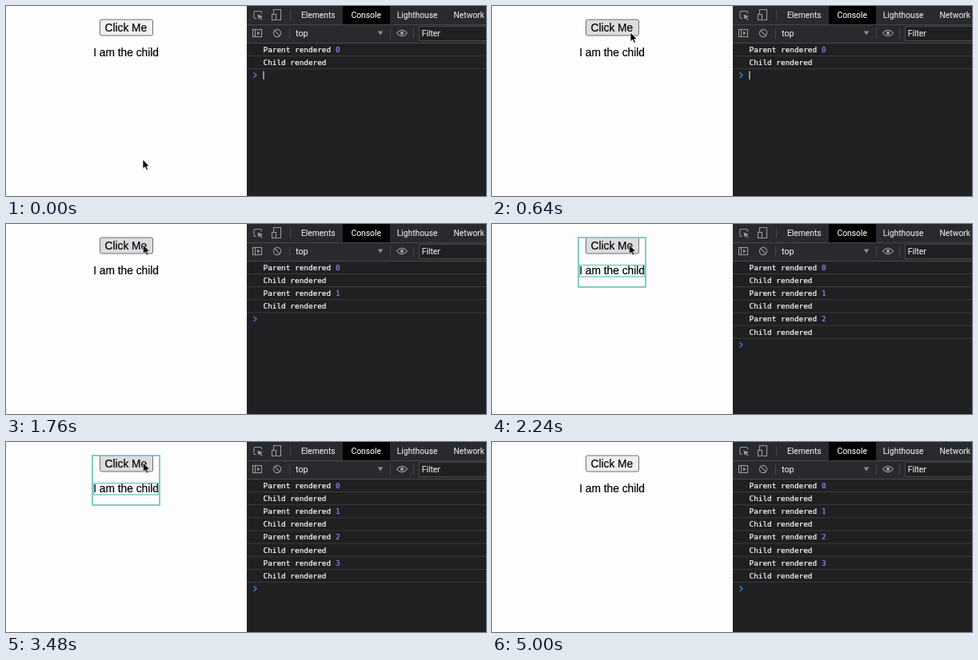
Write an HTML page that moves like this. It is 600x238 px and loops after 5040 ms.

```html
<!DOCTYPE html>
<html lang="en">
<head>
<meta charset="utf-8">
<title>Render log</title>
<style>
  html, body { margin: 0; width: 100%; height: 100%; overflow: hidden; background: #fefdfe; }
  svg { display: block; width: 600px; height: 238px; }
  .page { font: 13.75px "Liberation Sans", Arial, sans-serif; }
  .page text { fill: #000; stroke: #000; stroke-width: .2; }
  .ui { font: 10.3px Roboto, sans-serif; fill: #e8e8ea; stroke: #e8e8ea; stroke-width: .1; }
  .log { font: 9.4px "DejaVu Sans Mono", monospace; fill: #fff; stroke: #fff; stroke-width: .2; }
  .num { fill: #9780ff; stroke: #9780ff; }
  .icon { fill: none; stroke: #999; stroke-width: 1.1; }
  .line { fill: none; stroke: #46474a; }
  .row { stroke: #3a3a3d; }
  .hot { fill: none; stroke: #7fcdc6; }

  .cursor, .button, .caret, .prompt, .flash, .log1, .log2, .log3 {
    animation: 5040ms step-end infinite;
  }
  .cursor { animation-name: move; animation-timing-function: linear; }
  .button { animation-name: hover; }
  .caret { animation-name: blur; }
  .prompt { animation-name: push; }
  .flash { animation-name: flash; }
  .log1 { animation-name: first; }
  .log2 { animation-name: second; }
  .log3 { animation-name: third; }

  @keyframes move {
    0% { transform: translate(171px, 192.3px); animation-timing-function: cubic-bezier(.4, 0, .45, 1); }
    7.14% { transform: translate(177.5px, 41.5px); animation-timing-function: ease-out; }
    11.1%, 25.4% { transform: translate(173px, 33px); animation-timing-function: ease-in-out; }
    33.3%, 74.6% { transform: translate(171.5px, 26px); animation-timing-function: ease-in; }
    80.2%, 100% { transform: translate(177px, -18px); }
  }
  @keyframes hover {
    0% { fill: #efeff0; }
    9.52% { fill: #dcdce0; }
    77.8%, 100% { fill: #efeff0; }
  }
  @keyframes blur { 0% { opacity: 1; } 13.49%, 100% { opacity: 0; } }
  @keyframes push {
    0% { transform: translateY(0); }
    15.08% { transform: translateY(32.3px); }
    38.89% { transform: translateY(64.6px); }
    65.08%, 100% { transform: translateY(96.9px); }
  }
  @keyframes flash {
    0% { opacity: 0; }
    15.08% { opacity: 1; }
    22.22% { opacity: 0; }
    38.89% { opacity: 1; }
    46.03% { opacity: 0; }
    65.08% { opacity: 1; }
    72.22%, 100% { opacity: 0; }
  }
  @keyframes first { 0% { opacity: 0; } 15.08%, 100% { opacity: 1; } }
  @keyframes second { 0% { opacity: 0; } 38.89%, 100% { opacity: 1; } }
  @keyframes third { 0% { opacity: 0; } 65.08%, 100% { opacity: 1; } }
</style>
</head>
<body>
<svg viewBox="0 0 600 238">
  <defs>
    <g id="pair">
      <path class="row" d="M301 62.5H600M301 78.7H600"/>
      <text class="log" x="321.5" y="57.8">Parent rendered</text>
      <text class="log" x="321.5" y="74">Child rendered</text>
    </g>
  </defs>

  <g class="page">
    <rect class="button" x="117.5" y="17" width="66" height="20" rx="2" fill="#efeff0" stroke="#707070"/>
    <text x="123.500" y="31.500">Click Me</text>
    <text x="109.200" y="63">I am the child</text>
  </g>
  <g class="flash hot">
    <rect x="108" y="17" width="84" height="62" stroke-width="2"/>
    <rect x="109.5" y="51.5" width="81" height="14.5" stroke-width="1.5"/>
  </g>

  <rect x="301" width="299" height="238" fill="#202022"/>
  <rect x="301" width="299" height="46" fill="#292a2d"/>
  <rect x="421" width="59" height="23" fill="#000"/>
  <path class="line" d="M301 23.5H600M301 46.5H600M355.5 5V18M354.5 28V41M480.5 28V41M509.5 28V41"/>

  <g class="icon">
    <path d="M313 15.5H311.5Q310 15.5 310 14V8Q310 6.5 311.5 6.5H318Q319.5 6.5 319.5 8V9.5"/>
    <path d="M314.5 10.5L321 13L318.3 14.2L320.5 17L319.3 17.8L317.3 15L315.5 16.5Z" fill="#999" stroke="none"/>
    <path d="M334.5 10V4.5H343.5V17.5H338.5"/>
    <rect x="332.5" y="10.5" width="5" height="7"/>
    <rect x="308.5" y="29.5" width="11" height="9"/>
    <path d="M311.5 29.5V38.5"/>
    <path d="M314 31.5L317.5 34L314 36.5Z" fill="#999" stroke="none"/>
    <circle cx="339" cy="34" r="4.6"/>
    <path d="M335.8 30.8L342.2 37.2"/>
    <path d="M488.5 34Q495 26.5 501.5 34Q495 41.5 488.5 34Z"/>
    <circle cx="495" cy="34" r="2.2" fill="#999" stroke="none"/>
    <path d="M464.7 31.5H471.3L468 36.5Z" fill="#8c8c8c" stroke="none"/>
  </g>

  <rect x="516.5" y="25.5" width="90" height="18" fill="#202022" stroke="#48494c"/>
  <g class="ui">
    <text x="369" y="14.7">Elements</text>
    <text x="431.5" y="14.7" fill="#fff">Console</text>
    <text x="488.7" y="14.7">Lighthouse</text>
    <text x="559.5" y="14.7">Network</text>
    <text x="362" y="37.7" font-size="10.8">top</text>
    <text x="519.7" y="38.2">Filter</text>
  </g>

  <g id="logs"></g>
  <g class="prompt">
    <path d="M309.5 83.5L313 86.7L309.5 90" fill="none" stroke="#397fe0" stroke-width="1.4"/>
  </g>
  <path class="caret" d="M322 81.5V92" stroke="#dcdcdc" stroke-width="1.2"/>

  <path class="cursor" d="M0 0V11.5L2.7 9.2L4.5 13.2L6.5 12.3L4.8 8.4H8.3Z"
        fill="#000" stroke="#fff" stroke-width=".8"/>
</svg>
<script>
  const pair = n => `<g class="log${n}"><g transform="translate(0 ${n * 32.3})">
    <use href="#pair"/><text class="log num" x="412" y="57.8">${n}</text></g></g>`;
  document.getElementById("logs").innerHTML = [0, 1, 2, 3].map(pair).join("");
</script>
</body>
</html>
```
